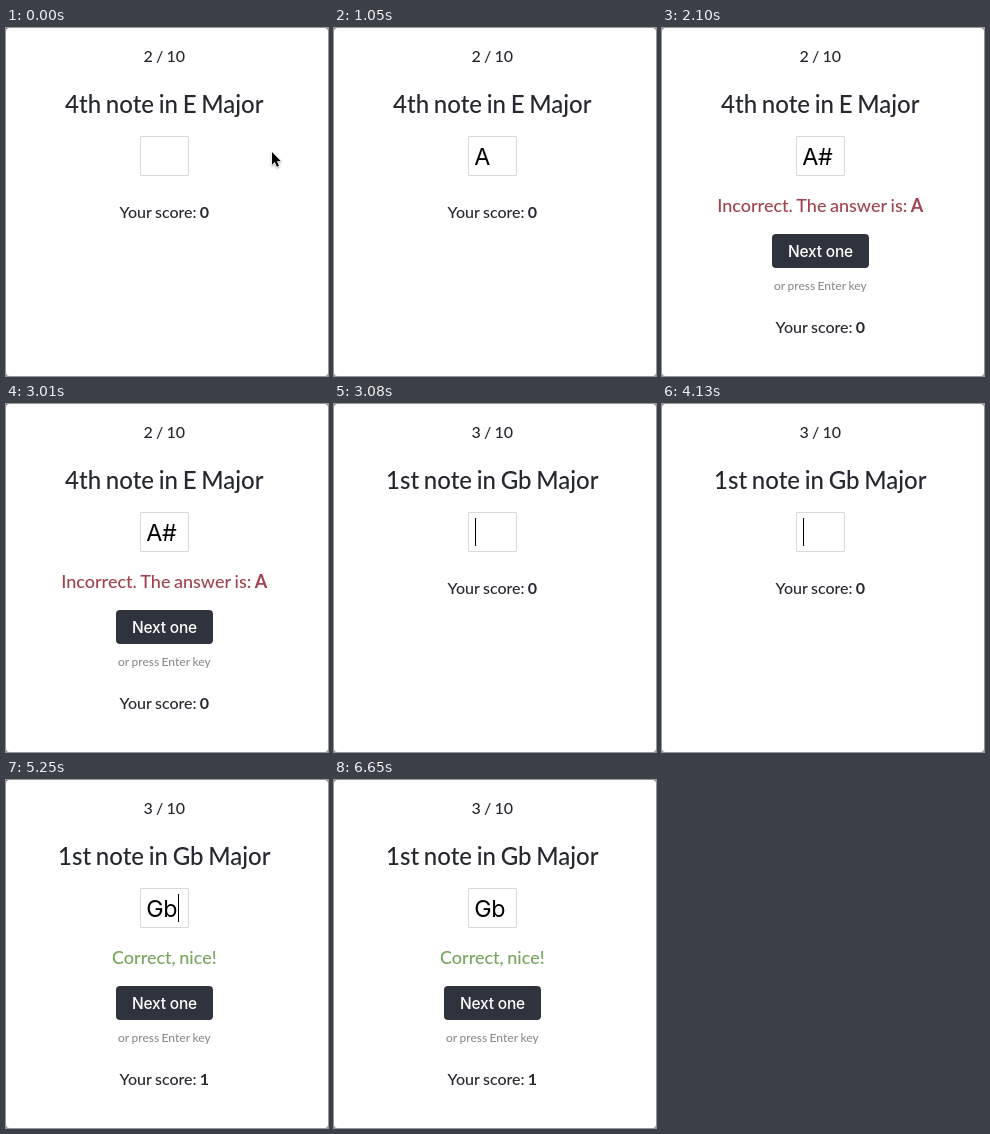
An HTML page with a canvas that plays this animation: 322x348 px, repeating every 7070 ms.

```html
<!DOCTYPE html>
<html lang="en">
<head>
<meta charset="utf-8">
<title>Note quiz</title>
<style>
  html, body { margin: 0; width: 100%; height: 100%; overflow: hidden; background: #fff; }
  canvas { display: block; width: 322px; height: 348px; }
</style>
</head>
<body>
<canvas id="stage"></canvas>
<script>
const W = 322, H = 348, LOOP = 7070, MID = 158.3;
const INK = '#25282f', RED = '#a1434e', GREEN = '#75a65c', DARK = '#2f333d';
const LATO = 'Lato, sans-serif', INTER = 'Inter, sans-serif';

const canvas = document.getElementById('stage');
const ctx = canvas.getContext('2d');
const dpr = window.devicePixelRatio || 1;
canvas.width = W * dpr;
canvas.height = H * dpr;
ctx.scale(dpr, dpr);

// Each entry: start time, then the value held until the next entry.
const typed = [[0, ''], [490, 'A'], [1400, 'A#'], [3080, ''], [4900, 'G'], [5040, 'Gb']];
const caretOn = [
  [0, false], [420, true], [1050, false], [1400, true], [1960, false], [2520, true],
  [3010, false], [3080, true], [3570, false], [4130, true], [4620, false],
  [4900, true], [5600, false], [6090, true], [6650, false]
];
const result = [[0, ''], [2100, 'wrong'], [3080, ''], [5250, 'right']];
const caretX = { '': 141, 'A': 157, 'A#': 172, 'G': 159, 'Gb': 172 };

function at(track, t) {
  let value = track[0][1];
  for (const [start, v] of track) if (t >= start) value = v;
  return value;
}

function text(str, x, y, font, color = INK) {
  ctx.font = font;
  ctx.fillStyle = color;
  ctx.fillText(str, x, y);
  return ctx.measureText(str).width;
}

// Centres a line made of a regular part and an optional bold part.
function line(str, y, size, color = INK, bold = '') {
  const regularFont = `500 ${size}px ${LATO}`, boldFont = `bold ${size}px ${LATO}`;
  ctx.wordSpacing = `${-0.057 * size}px`;
  ctx.font = regularFont;
  let width = ctx.measureText(str).width;
  ctx.font = boldFont;
  width += ctx.measureText(bold).width;
  const x = MID - width / 2;
  const used = text(str, x, y, regularFont, color);
  if (bold) text(bold, x + used, y, boldFont, color);
  ctx.wordSpacing = '0px';
}

function box(x, y, w, h, r, color) {
  ctx.fillStyle = color;
  ctx.beginPath();
  ctx.roundRect(x, y, w, h, r);
  ctx.fill();
}

function input(value, caret) {
  ctx.strokeStyle = '#d9d9d9';
  ctx.lineWidth = 1;
  ctx.strokeRect(134.5, 108.5, 48, 39);
  ctx.letterSpacing = '-0.3px';
  text(value, 140.2, 137, `23.3px ${INTER}`, '#000');
  ctx.letterSpacing = '0px';
  if (caret) {
    ctx.fillStyle = '#000';
    ctx.fillRect(caretX[value], 114, 1, 28);
  }
}

function pointer(x, y) {
  ctx.beginPath();
  [[0, 0], [0, 12.7], [2.8, 10], [4.9, 14.8], [7, 13.9], [5, 9.2], [8.7, 8.9]]
    .forEach(([dx, dy]) => ctx.lineTo(x + dx, y + dy));
  ctx.closePath();
  ctx.lineJoin = 'round';
  ctx.lineWidth = 1.6;
  ctx.strokeStyle = '#fff';
  ctx.shadowColor = 'rgba(0,0,0,.35)';
  ctx.shadowBlur = 2 * dpr;
  ctx.shadowOffsetY = dpr;
  ctx.stroke();
  ctx.shadowColor = 'transparent';
  ctx.fillStyle = '#000';
  ctx.fill();
}

function draw(t) {
  const second = t >= 3080;
  const state = at(result, t);

  ctx.fillStyle = '#858585';
  ctx.fillRect(0, 0, W, H);
  box(0, 0, W, H, 3.5, '#fff');

  line(second ? '3 / 10' : '2 / 10', 34, 16);
  line(second ? '1st note in Gb Major' : '4th note in E Major', 85, 24);
  input(at(typed, t), at(caretOn, t));

  if (state) {
    if (state === 'wrong') line('Incorrect. The answer is: ', 184, 18, RED, 'A');
    else line('Correct, nice!', 184, 18, GREEN);
    box(110, 206, 97, 34, 4, DARK);
    ctx.letterSpacing = '-0.2px';
    text('Next one', 126, 229, `500 15.5px ${INTER}`, '#fff');
    ctx.letterSpacing = '0px';
    line('or press Enter key', 262, 12, '#8c8c8c');
  }
  line('Your score: ', state ? 305 : 190, 16, INK, state === 'right' ? '1' : '0');

  if (t < 490) pointer(266, 124);
}

const begin = performance.now();
function tick() {
  draw((performance.now() - begin) % LOOP);
  requestAnimationFrame(tick);
}
tick();
</script>
</body>
</html>
```
